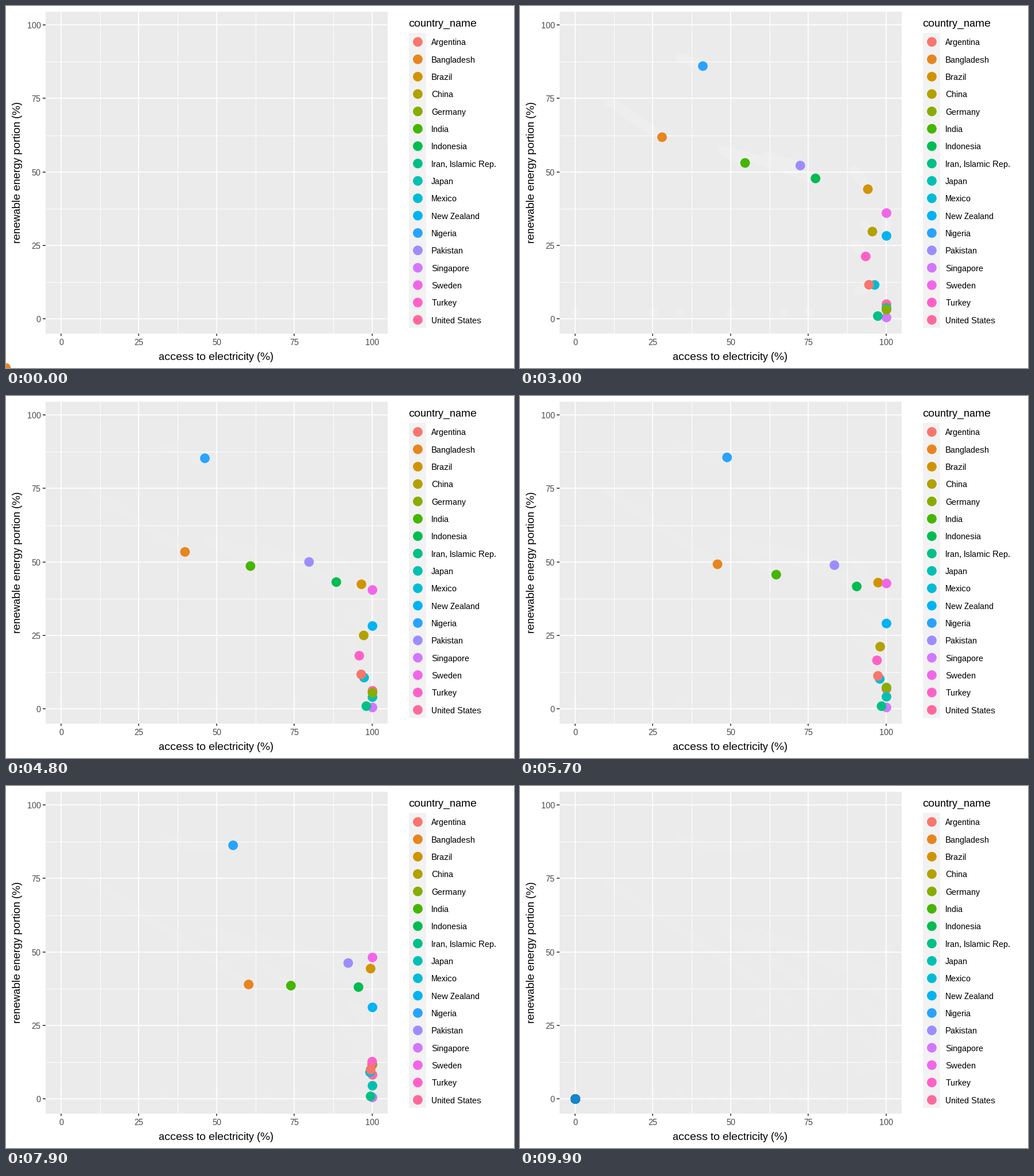
A matplotlib script that plays this animation: 885x632 px, repeating every 10 s.

```python
import numpy as np
import matplotlib.pyplot as plt
from matplotlib.animation import FuncAnimation
from matplotlib.patches import Rectangle

plt.rcParams.update({"font.family": "Liberation Sans", "text.hinting": "native",
                     "text.hinting_factor": 1})
W, H, DPI = 885, 632, 100
FRAMES, STEP = 100, 100
START, DROP, SLIDE, END = 4, 92, 95, FRAMES - 1
EARLY, MIDDLE, LATE = 14, 39, 79
RADIUS = 8.4

# (access, renewable) at the early, sometimes the middle, and the late moment
ROUTES = {
    "Argentina": [(92.4, 10.5), (95.5, 12.3), (99.4, 10)],
    "Bangladesh": [(17.3, 69.4), (60.2, 39)],
    "Brazil": [(91.2, 48.3), (95.6, 41.9), (99.4, 44.4)],
    "China": [(93.8, 31.3), (96.4, 28.9), (99.9, 11.8)],
    "Germany": [(100, 2.1), (100, 3.7), (100, 11.7)],
    "India": [(50.2, 55.9), (57, 51.6), (73.8, 38.6)],
    "Indonesia": [(61, 53.5), (86.3, 44.7), (95.5, 38.1)],
    "Iran, Islamic Rep.": [(96.5, 1), (99.4, 0.9)],
    "Japan": [(100, 3.5), (100, 4.5)],
    "Mexico": [(95.2, 12.4), (99.2, 9.1)],
    "New Zealand": [(100, 29.9), (100, 27.4), (100, 31.2)],
    "Nigeria": [(36.5, 88), (43.5, 85.1), (55.2, 86.4)],
    "Pakistan": [(65.8, 54.2), (92.2, 46.3)],
    "Singapore": [(100, 0.5), (100, 0.5)],
    "Sweden": [(100, 32.1), (100, 48.2)],
    "Turkey": [(91.2, 24.1), (99.9, 12.7)],
    "United States": [(100, 4), (100, 8.2)],
}
NAMES = list(ROUTES)
# Drawn last, from lower to upper
TOPS = ["United States", "Japan", "Singapore", "Germany", "Iran, Islamic Rep.",
        "Mexico", "Turkey", "Argentina"]
ORDER = [n for n in NAMES if n not in TOPS] + TOPS


def hue(i, chroma=100, light=65):
    """Evenly spaced hue in polar LUV, as sRGB."""
    h = np.radians(15 + 360 * i / len(NAMES))
    u = chroma * np.cos(h) / (13 * light) + 0.1978
    v = chroma * np.sin(h) / (13 * light) + 0.4683
    y = ((light + 16) / 116) ** 3
    xyz = y * np.array([9 * u, 4 * v, 12 - 3 * u - 20 * v]) / (4 * v)
    rgb = np.array([[3.2405, -1.5371, -0.4985],
                    [-0.9693, 1.8760, 0.0416],
                    [0.0556, -0.2040, 1.0572]]) @ xyz
    rgb = np.clip(rgb, 0, 1)
    return np.where(rgb > 0.0031308, 1.055 * rgb ** (1 / 2.4) - 0.055, 12.92 * rgb)


COLORS = {name: hue(i) for i, name in enumerate(NAMES)}


def px(v):
    return 95.95 + 5.42 * v


def py(v):
    return 545.85 - 5.125 * v


def pt(pixels):
    return pixels * 72 / DPI


def extend(t, a, b):
    """Value at t on the line through two (time, point) pairs."""
    return a[1] + (b[1] - a[1]) * (t - a[0]) / (b[0] - a[0])


def path(name):
    pts = np.array(ROUTES[name], float)
    times = [EARLY, MIDDLE, LATE] if len(pts) == 3 else [EARLY, LATE]
    knots = list(zip(times, pts))
    first = extend(START, *knots[:2])
    last = np.clip(extend(DROP, *knots[-2:]), 0, 100)
    knots = [(START, first), *knots, (DROP, last),
             (SLIDE, last * [1, 0]), (END, last * 0)]
    t, pts = zip(*knots)
    x, y = np.transpose(pts)
    now = np.arange(FRAMES)
    x = np.interp(now, t, x)
    if name == "Germany":  # a missing year counts as zero access
        x *= np.clip(abs(now - 18) / np.where(now < 18, 3, 4), 0, 1)
    return np.column_stack([px(x), py(np.interp(now, t, y))]) + 0.5


PATHS = np.array([path(name) for name in ORDER])

fig = plt.figure(figsize=(W / DPI, H / DPI), dpi=DPI, facecolor="white")
ax = fig.add_axes([0, 0, 1, 1])
ax.set_xlim(0, W)
ax.set_ylim(H, 0)
ax.axis("off")

LEFT, TOP, RIGHT, BOTTOM = 69, 9.5, 665, 571.5
SMALL, LARGE = 15, 19


def box(x0, y0, x1, y1, color):
    ax.add_patch(Rectangle((x0, y0), x1 - x0, y1 - y0, fc=color, ec="none", zorder=0))


def line(x, y, width, color="white"):
    ax.plot(x, y, color=color, lw=pt(width), solid_capstyle="butt", zorder=2)


def label(x, y, s, size, color="black", ha="left", **kw):
    ax.text(x, y, s, fontsize=pt(size), color=color, ha=ha, va="baseline", **kw)


def dots(zorder):
    return ax.scatter([], [], s=pt(2 * RADIUS) ** 2, lw=0, zorder=zorder)


box(LEFT, TOP, RIGHT, BOTTOM, "#EBEBEB")
for v in np.arange(12.5, 100, 25):
    line([px(v)] * 2, [TOP, BOTTOM], 0.93)
    line([LEFT, RIGHT], [py(v)] * 2, 0.93)
for v in range(0, 101, 25):
    x, y = px(v), py(v)
    line([x, x], [TOP, BOTTOM], 1.8)
    line([LEFT, RIGHT], [y, y], 1.8)
    line([x, x], [BOTTOM, BOTTOM + 4.8], 1.6, "#333333")
    line([LEFT - 4.8, LEFT], [y, y], 1.6, "#333333")
    label(x, 592.3, str(v), SMALL, "#4D4D4D", "center")
    label(60.5, y + 6, str(v), SMALL, "#4D4D4D", "right")
label(366.5, 618, "access to electricity (%)", LARGE, ha="center")
label(25.5, 290.5, "renewable energy portion (%)", LARGE, ha="center",
      rotation=90, rotation_mode="anchor")

label(701.5, 35.7, "country_name", LARGE)
box(702, 47, 732, 562, "#F2F2F2")
rows = 62.7 + 30.33 * np.arange(len(NAMES))
legend = dots(3)
legend.set_offsets(np.column_stack([np.full(len(rows), 717.4), rows]))
legend.set_facecolor(list(COLORS.values()))
for name, y in zip(NAMES, rows):
    label(741.2, y + 5.6, name, SMALL)

trail, points = dots(1), dots(3)


def update(frame):
    shown = PATHS[:, frame] if frame >= START else np.empty((0, 2))
    points.set_offsets(shown)
    points.set_facecolor("#1785CA" if frame == END else [COLORS[n] for n in ORDER])
    trail.set_offsets(PATHS[:, START:max(frame, START)].reshape(-1, 2))
    trail.set_facecolor("#EEEEEE" if frame < 36 else "#ECECEC")
    return trail, points


anim = FuncAnimation(fig, update, frames=FRAMES, interval=STEP, repeat=True,
                     repeat_delay=0, blit=False)
plt.show()
```
